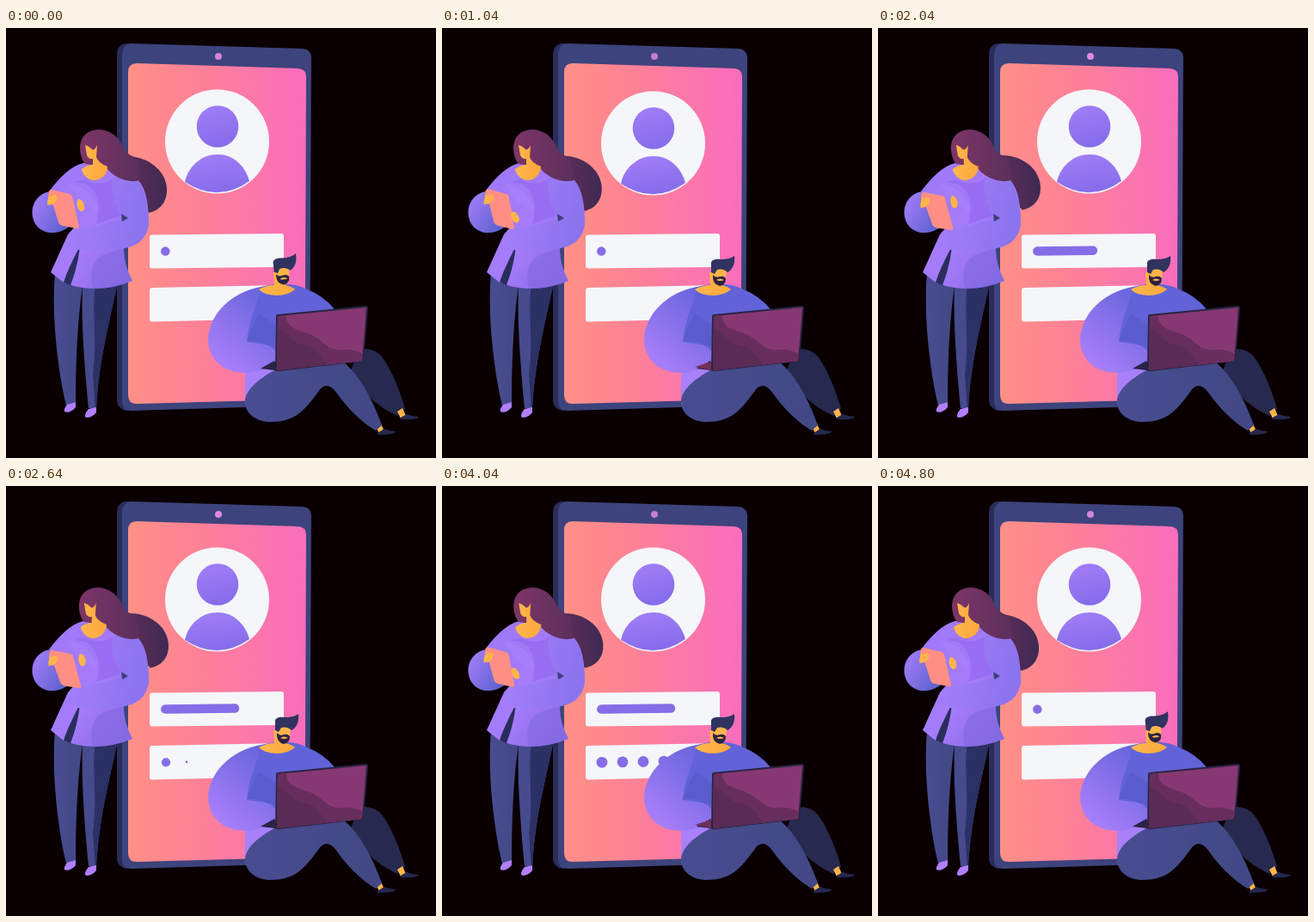
Recreate the animation shown at these times as an HTML page. Size 500 px wide and 500 px high, loop 4.84 s.

```html
<!DOCTYPE html>
<html lang="en">
<head>
<meta charset="utf-8">
<title>Sign in</title>
<style>
html, body { margin: 0; height: 100%; overflow: hidden; background: #0a0002; }
svg { display: block; width: 100vw; height: 100vh; }
</style>
</head>
<body>
<svg viewBox="0 0 500 500">
  <defs>
    <linearGradient id="screen"><stop stop-color="#ff9086"/><stop offset=".35" stop-color="#fe8394"/><stop offset="1" stop-color="#f96dbd"/></linearGradient>
    <linearGradient id="violet" x2=".3" y2="1"><stop stop-color="#a37ff7"/><stop offset="1" stop-color="#876deb"/></linearGradient>
    <linearGradient id="blouse" x2="1" y2="1"><stop stop-color="#9d78f6"/><stop offset=".5" stop-color="#a57cfa"/><stop offset="1" stop-color="#8165e0"/></linearGradient>
    <linearGradient id="cuff" x2="1" y2=".6"><stop stop-color="#aa80fc"/><stop offset="1" stop-color="#5e62cf"/></linearGradient>
    <linearGradient id="forearm" x2="1" y2=".2"><stop stop-color="#a67ffa"/><stop offset="1" stop-color="#8b74ee"/></linearGradient>
    <linearGradient id="hair"><stop stop-color="#7d3566"/><stop offset="1" stop-color="#5a2f5b"/></linearGradient>
    <linearGradient id="tailFill"><stop stop-color="#603059"/><stop offset=".55" stop-color="#552c57"/><stop offset="1" stop-color="#3f2a52"/></linearGradient>
    <linearGradient id="sleeve" x1=".9" y1="0" x2=".2" y2="1"><stop stop-color="#6263d8"/><stop offset=".45" stop-color="#8370e8"/><stop offset="1" stop-color="#ad80fc"/></linearGradient>
    <linearGradient id="leg" x2="1"><stop stop-color="#484d91"/><stop offset="1" stop-color="#414884"/></linearGradient>
    <linearGradient id="skin" x2="1"><stop stop-color="#ffb84c"/><stop offset="1" stop-color="#fca73d"/></linearGradient>
    <clipPath id="lid"><path d="M316 335L419 325L414 387L315 398Z"/></clipPath>
  </defs>

  <g id="phone">
    <path fill="#2a2d5a" d="M138 18Q129 20 129 32V434Q130 443 140 445L160 440V20Z"/>
    <path fill="#3d437c" d="M146 18L345 24Q355 25 355 35L353 430Q353 438 342 439L146 445Q135 445 135 434V30Q136 18 146 18Z"/>
    <path fill="url(#screen)" d="M152 41L340 47Q349 48 349 56L347.500 424Q347 431 336 432L152 437Q142 437 142 427V51Q142 41 152 41Z"/>
    <circle id="lens" cx="247" cy="33" r="4" fill="#e38ae6"/>
  </g>

  <g id="avatar">
    <circle cx="245.500" cy="132" r="60.500" fill="#f4f6fa"/>
    <circle cx="246" cy="114.500" r="24.300" fill="url(#violet)"/>
    <path fill="url(#violet)" d="M208 179C212 160 228 147 246 147S278 160 283 178Q246 204 208 179Z"/>
  </g>

  <g fill="#f4f6fa">
    <path d="M170 240.500L320 239Q323 239 323 242V275Q323 278 320 278L170 279.500Q167 279.500 167 276.500V243.500Q167 240.500 170 240.500Z"/>
    <path d="M170 302L320 299V338L170 341.500Q167 341.500 167 338.500V305Q167 302 170 302Z"/>
  </g>
  <path id="bar" stroke="#846de6" stroke-width="10.500" stroke-linecap="round"/>
  <g id="dots" fill="#846de6"></g>

  <g id="woman">
    <path id="tail" fill="url(#tailFill)" d="M116 132C135 138 136 147 150 150C169 153 186 168 187 186C188 203 178 214 163 215L140 185L114 160Z"/>
    <path fill="url(#leg)" d="M57 285C53 330 59 392 70 439L81 436C81 390 83 340 89 300Z"/>
    <path fill="#454b8c" d="M89 298C87 345 92 400 96 442L105 443C108 390 117 355 130 296Z"/>
    <path fill="#2b3065" d="M104 300C99 330 107 360 101 403L104 443H105C108 390 117 355 130 296Z"/>
    <g fill="#b17fff">
      <path d="M71 438L81 435V441C77 446 71 448 68 446Q67 443 71 438Z"/>
      <path d="M96 443L105 441V447C100 453 94 454 92 452Q91 449 96 443Z"/>
    </g>
    <path fill="#292d5d" d="M86 253L65 294L76 300L88 295Z"/>
    <path fill="url(#cuff)" d="M54 190C40 190 30.500 202 30.500 214C30.500 230 42 239 56 238Q66 237 75 230L66 191Z"/>
    <path fill="url(#blouse)" d="M90 157C75 161 64 172 50 190L70 205L79 232L72 240L52 284L67 296C72 280 80 266 86 253C84 272 80 286 75 299Q110 309 147 294C140 280 137 270 137 256C157 251 166 239 166 225C166 203 162 179 147 172L118 157Z"/>
    <path fill="#8f67ef" opacity=".6" d="M91 176C111 187 122 176 125 174C121 193 130 208 134 218L105 228C113 205 97 185 75 181Z"/>
    <path fill="#7f68de" opacity=".55" d="M137 256C120 262 92 262 101 303Q126 303 147 294C140 280 137 270 137 256Z"/>
    <path fill="url(#forearm)" d="M124 178C126 170 140 169 148 173C161 180 166 205 166 227C164 247 150 256 130 257L83 258Q72 249 79 232L94 233L136 222C128 206 121 194 124 178Z"/>
    <path fill="#3b4077" d="M134 216L142 221L135 225Z"/>
    <path fill="#aa83fb" opacity=".55" d="M73 181C95 175 109 190 108 215L84 200Z"/>
    <g id="tablet">
      <path fill="#ffb146" d="M50 190L58 192L55 205L48 206Z"/>
      <path fill="#ff8f85" d="M53 188L74 193Q77 194 77 196L85 231Q85 234 82 233L66 230Q62 229 61 226L50 191Q50 188 53 188Z"/>
      <path fill="#ffb449" d="M49 205C46 200 52 194 58 194Q61 199 56 204Z"/>
    </g>
    <path id="hand" fill="#ffb449" d="M84 199C89 199 92 205 91 211Q87 216 84 210Q81 204 84 199Z"/>
    <g id="womanHead">
      <path fill="url(#hair)" d="M92 158C84 149 80 119 108 118C126 119 133 131 138 142Q143 148 152 152L157 177C142 181 126 174 118 164L105 160Z"/>
      <path fill="url(#skin)" d="M92 136Q96 137 100 141Q103 143 106 136L105 150Q107 157 118 161C118 170 111 177 102 177C94 176 89 170 88 164Q95 159 101 159V152Q96 153 94 148Z"/>
    </g>
  </g>

  <g id="man">
    <path fill="#27294f" d="M411 373Q429 372 437 382C450 400 459 425 464 443L455 451C437 442 420 432 400 400Z"/>
    <g fill="#ffb449"><path d="M455 446L461 442L465 451L459 454Z"/><path d="M430 464L436 460L439 467L434 471Z"/></g>
    <g fill="#25284e">
      <path d="M459 453L466 449Q473 452 480 452Q479 456 459 455Z"/>
      <path d="M432 471L440 466Q446 469 453 469Q453 473 432 473Z"/>
    </g>
    <path fill="#aa80fa" d="M278 390H320V425L278 438Z"/>
    <path fill="#6263d8" d="M290 303C310 296 335 296 348 303Q369 311 382 327L381 390L310 397L270 365Z"/>
    <path fill="url(#leg)" d="M312 398L393 389C412 404 428 436 437 462L430 468C412 458 394 438 385 425Q375 411 366 419C350 440 340 458 308 458C290 458 278 448 278 434C279 420 294 408 312 398Z"/>
    <path fill="url(#sleeve)" d="M297 301C262 307 237 332 235 361C235 386 253 402 282 401C296 399 305 394 314 389L314 370L280 365C282 340 291 325 297 301Z"/>
    <path fill="#5658c8" opacity=".65" d="M294 332C287 346 283 354 280 365Q296 360 314 376V345Z"/>
    <path fill="#2a2445" d="M296 396L312 387L320 399Z"/>
    <path id="typing" fill="#713057" d="M294 394L313 388L314 398Z"/>
    <path fill="url(#skin)" d="M294 304Q303 299 312 299L311 284H324L325 299Q333 301 336 304Q328 311 315 311Q301 311 294 304Z"/>
    <g id="manHead">
      <path fill="#ffb449" d="M315 278L331 281L330 292L320 298L314 290Z"/>
      <path fill="#30335f" d="M313 275C312 270 317 268 324 269Q335 269 340 265C341 274 338 281 332 284Q327 279 320 281L317 286L313 284Z"/>
      <path fill="#2b2343" d="M315 287Q318 291 323 289Q328 288 330 291Q330 299 323 300Q314 298 315 287Z"/>
      <path fill="#ffb449" d="M319 293Q323 290 328 293Q323 295 319 293Z"/>
    </g>
    <path fill="#2b2443" d="M316 333L418 323Q421 323 421 326L416 385Q416 388 413 388L318 399Q313 400 313 396L314 336Q314 333 316 333Z"/>
    <g clip-path="url(#lid)">
      <path fill="#873872" d="M310 320H425V400H310Z"/>
      <path fill="#672e5d" d="M310 330H326C324 349 338 350 351 355C370 362 374 377 392 374Q406 372 420 382V402H310Z"/>
      <path fill="#592b55" d="M310 350C329 349 329 365 346 369C365 371 365 386 378 394L310 402Z"/>
    </g>
  </g>
</svg>
<script>
const LOOP = 4840;
const el = id => document.getElementById(id);
const set = (id, name, value) => el(id).setAttribute(name, value);
const clamp = u => Math.max(0, Math.min(1, u));
const span = (t, from, to) => {
  const u = clamp((t - from) / (to - from));
  return u * u * (3 - 2 * u);
};

const dots = [0, 1, 2, 3].map(i => {
  const dot = document.createElementNS("http://www.w3.org/2000/svg", "circle");
  dot.setAttribute("cx", 186 + 24 * i);
  dot.setAttribute("cy", 321.3 - 0.4 * i);
  return el("dots").appendChild(dot);
});

function draw(t) {
  // Everything returns to its first pose before the loop restarts
  const active = 1 - span(t, 4150, 4750);
  const awake = span(t, 0, 800) * active;
  // One slow swing drives the head, hand and tablet
  const swing = -Math.cos(2 * Math.PI * (t - 2340) / 2800) * awake;

  const bob = 2 * (span(t, 560, 1000) - span(t, 1100, 1550));
  set("avatar", "transform", `translate(0 ${bob})`);
  set("lens", "opacity", 0.9 - 0.1 * swing);

  const typed = span(t, 1200, 2380) * active;
  set("bar", "d", `M185.3 259.6L${185.31 + 80.7 * typed} ${259.6 - typed}`);
  dots.forEach((dot, i) => {
    const start = 2300 + 200 * i;
    dot.setAttribute("r", 6.4 * span(t, start, start + 480) * active);
  });

  const lean = -2 * awake - swing;
  set("tail", "transform", `translate(${lean} 0) rotate(${-6.5 * span(t, 0, 2000) * active} 135 160)`);
  set("womanHead", "transform", `translate(${lean} 0)`);

  const dip = Math.max(0, -swing);
  set("tablet", "transform", `translate(${2 * dip} ${3 * dip}) rotate(${3 * swing} 68 212)`);
  const reach = 4 * awake + 10 * swing;
  set("hand", "transform", `translate(${-2 * swing} ${reach}) rotate(${-reach} 87 206)`);

  const nod = 1 - awake;
  set("manHead", "transform", `translate(0 ${-nod}) rotate(${-5 * nod} 318 300)`);
  set("typing", "opacity", clamp(0.5 * awake + 0.7 * swing));
}

function frame(now) {
  draw(now % LOOP);
  requestAnimationFrame(frame);
}
requestAnimationFrame(frame);
</script>
</body>
</html>
```
